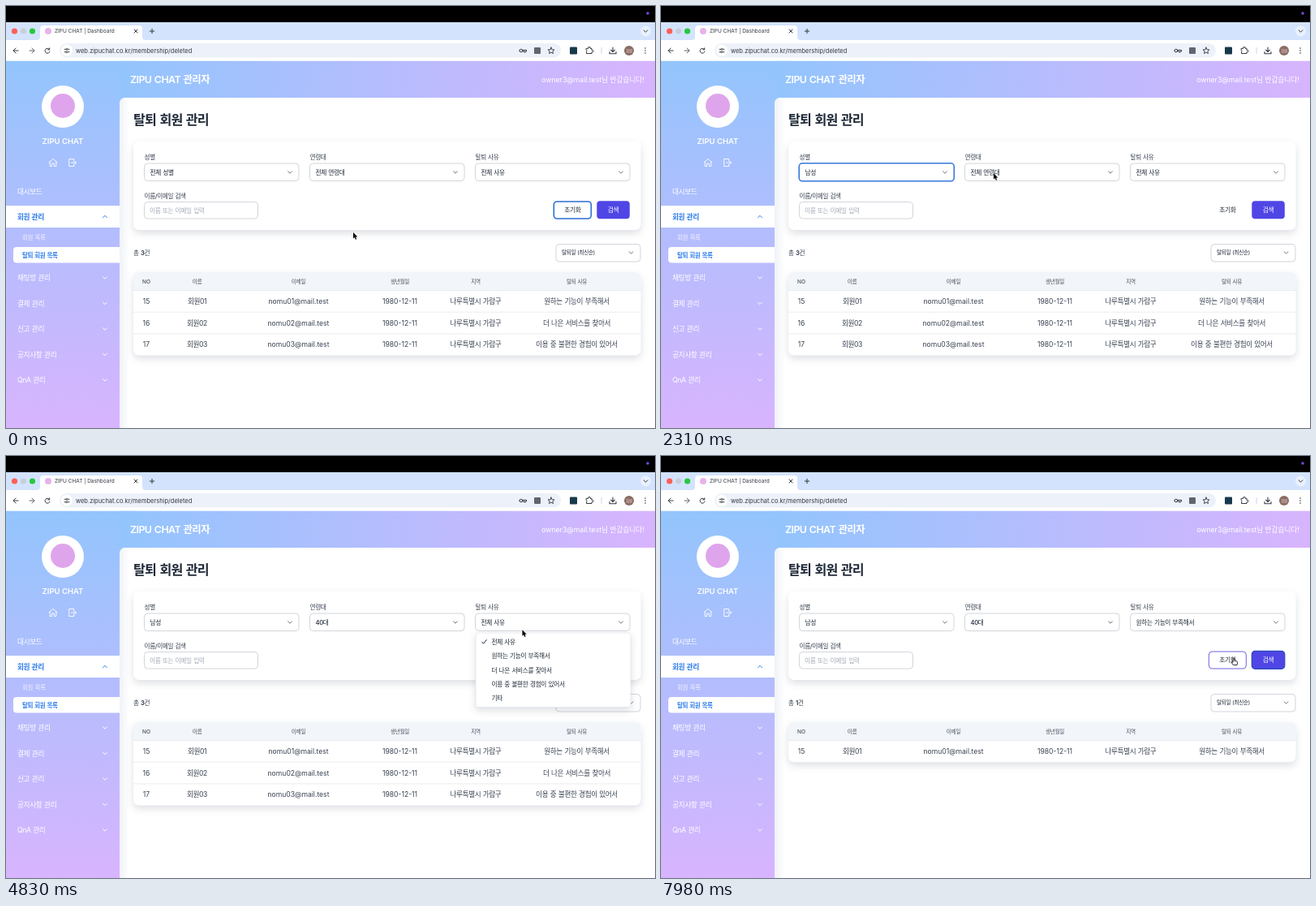
Recreate the animation shown at these times as an HTML page. Size 800 by 520 pixels, loop 8 s.

```html
<!DOCTYPE html>
<html lang="ko">
<head>
<meta charset="utf-8">
<title>ZIPU CHAT | Dashboard</title>
<style>
  html, body { margin: 0; width: 100%; height: 100%; overflow: hidden; background: #fff; }
  svg { display: block; width: 800px; height: 520px; font-family: Inter, "Noto Sans CJK KR", "Noto Sans CJK", sans-serif; }
  .line { fill: none; stroke-linecap: round; stroke-linejoin: round; }
  .shadow { filter: drop-shadow(0 4px 5px rgba(30, 41, 70, .15)); }
</style>
</head>
<body>
<svg viewBox="0 0 800 520">
  <defs>
    <linearGradient id="side" x1="0" y1="0" x2="0" y2="1">
      <stop stop-color="#93c5fd"/><stop offset="1" stop-color="#d8b4fe"/>
    </linearGradient>
    <linearGradient id="head">
      <stop stop-color="#93c5fd"/><stop offset="1" stop-color="#d8b4fe"/>
    </linearGradient>
    <linearGradient id="edge">
      <stop stop-color="#eff2f7"/><stop offset="1" stop-color="#fff"/>
    </linearGradient>
  </defs>
  <g id="scenery"></g>
  <g id="live"></g>
</svg>
<script>
const BRAND = 'ZIPU CHAT', INK = '#1f2937', BORDER = '#d1d5db', FOCUS = '#3977dc';
const LOOP = 8000, STEP = 70;

// Drawing helpers
const text = (x, y, size, str, fill = INK, weight = 400, anchor = 'start') => {
  const tight = /[가-힣]/.test(str) && !/@/.test(str);
  const spacing = tight ? `letter-spacing="${-.045 * size}" word-spacing="${.07 * size}"` : '';
  return `<text x="${x}" y="${y + size * .36}" font-size="${size}" fill="${fill}" font-weight="${weight}"
    text-anchor="${anchor}" ${spacing}>${str}</text>`;
};
const rect = (x, y, w, h, r, fill, extra = '') =>
  `<rect x="${x}" y="${y}" width="${w}" height="${h}" rx="${r}" fill="${fill}" ${extra}/>`;
const circle = (x, y, r, fill) => `<circle cx="${x}" cy="${y}" r="${r}" fill="${fill}"/>`;
const line = (d, color, width = 1, x = 0, y = 0) =>
  `<path class="line" d="${d}" stroke="${color}" stroke-width="${width}" transform="translate(${x} ${y})"/>`;
const chevron = (x, y, color = '#6b7280', up = false) =>
  line(up ? 'M-2.4 1.2L0-1.2 2.4 1.2' : 'M-2.4-1.2L0 1.2 2.4-1.2', color, 1, x, y);
const box = (x, y, w, h, stroke = BORDER, width = 1) =>
  rect(x, y, w, h, 4, '#fff', `stroke="${stroke}" stroke-width="${width}"`);

function browser() {
  const dark = '#333840';
  return rect(0, 0, 800, 20, 0, '#000') + circle(791, 9, 1.8, '#6d4bd8')
    + rect(0, 20, 800, 22, 0, '#d3e3fd') + rect(0, 42, 800, 25.5, 0, '#fff')
    + circle(10.5, 31, 3.6, '#ff5f57') + circle(21.5, 31, 3.6, '#c9ced8') + circle(32.5, 31, 3.6, '#28c840')
    + '<path d="M38 42Q42 42 42 38V28Q42 24 46 24H164Q168 24 168 28V38Q168 42 172 42Z" fill="#fff"/>'
    + circle(52, 31, 4, '#e6b3ea')
    + text(60, 31, 6.5, BRAND + ' | Dashboard', dark)
    + line('M-2-2L2 2M2-2L-2 2', dark, 1, 160, 31)
    + line('M-2.7 0H2.7M0-2.7V2.7', dark, 1, 180, 31)
    + circle(788.5, 31, 6.5, '#e9f1fe') + chevron(788.5, 31, dark)
    + line('M3 0H-3M0-3L-3 0 0 3', dark, 1, 12, 55)
    + line('M-3 0H3M0-3L3 0 0 3', '#5f6570', 1, 32, 55)
    + line('M2.5-1.6A3 3 0 1 0 3 1M2.7-3.2V-1.2H.7', dark, 1, 51, 55)
    + rect(66, 46, 618, 17.5, 8.75, '#edf1f9') + circle(75, 54.8, 7, '#fff')
    + line('M-3-1.7H-1M1.5-1.7H3M-3 1.7H-1.5M1 1.7H3', dark, .9, 75, 55)
    + line('M-.8-1.7a1 1 0 1 0 2 0a1 1 0 1 0-2 0M-1.3 1.7a1 1 0 1 0 2 0a1 1 0 1 0-2 0', dark, .8, 75, 55)
    + text(86, 55, 7.5, 'web.zipuchat.co.kr/membership/deleted', dark)
    + line('M-4 0a1.8 1.8 0 1 0 3.6 0a1.8 1.8 0 1 0-3.6 0M-.4-.7H4.5V1H3.2V2H1.8V.8H-.4', dark, 1, 637, 55)
    + rect(651, 51, 8, 8, 1, '#5f6570')
    + line('M0-4L1.1-1.3 4-1.1 1.8.8 2.5 3.6 0 2.1-2.5 3.6-1.8.8-4-1.1-1.1-1.3Z', dark, .9, 672, 55)
    + rect(695, 50.5, 9, 9, 1, '#17394a')
    + line('M-3.5-2.2H-1.2A1.3 1.3 0 1 1 1.2-2.2H3V0A1.3 1.3 0 1 1 3 2.2V4H-3.5V1.8A1 1 0 0 0-3.5 0Z', dark, 1, 719, 54.5)
    + line('M0-3.5V3.5', '#c7d3ea', 1, 734, 55)
    + line('M0-4V1.4M-2.4-.8L0 1.5 2.4-.8M-4 1.5V3.7H4V1.5', dark, 1.1, 748, 55)
    + circle(768, 55, 6, '#8b6b63') + text(768, 55, 4.4, '회원', '#f3e8e4', 400, 'middle')
    + [-3, 0, 3].map(dy => circle(788, 55 + dy, .8, dark)).join('');
}

function sidebar() {
  const menu = ['채팅방 관리', '결제 관리', '신고 관리', '공지사항 관리', 'QnA 관리'];
  const blue = '#2b7bea';
  return rect(0, 67.5, 160, 453, 0, 'url(#side)') + rect(140, 67.5, 660, 60, 0, 'url(#head)')
    + circle(70, 124, 26, '#fff') + circle(70, 123, 15, '#dfa5ec')
    + text(70, 167, 9.5, BRAND, '#fff', 600, 'middle')
    + line('M-5-.3L0-4.6 5-.3M-3.8-1.2V4.5H-1.4V1H1.4V4.5H3.8V-1.2', '#fff', .9, 58, 193)
    + line('M1.7-2V-4.5H-4.3V4.5H1.7V2M-1.5 0H4.6M2.6-2L4.6 0 2.6 2', '#fff', .9, 82, 193)
    + text(14, 229, 8.7, '대시보드', '#fff')
    + rect(0, 246, 140, 27, 0, '#fff') + text(14, 259.5, 8.7, '회원 관리', blue, 600) + chevron(122, 259.5, blue, true)
    + text(20, 285, 7.5, '회원 목록', '#f4f1ff')
    + rect(9, 297, 135, 19.5, 4, '#fff') + text(20, 307, 7.5, '탈퇴 회원 목록', blue, 600)
    + menu.map((name, i) => text(14, 335 + i * 31.5, 8.7, name, '#fff') + chevron(122, 335 + i * 31.5, '#fff')).join('')
    + text(153, 91, 12.4, BRAND + ' 관리자', '#fff', 600)
    + text(787, 91, 8.7, 'owner3@mail.test님 반갑습니다!', '#fff', 400, 'end')
    + '<path d="M140 520V121Q140 113 148 113H800V520Z" fill="#fff"/>'
    + '<path d="M140 520V121Q140 113 148 113H152V520Z" fill="url(#edge)"/>';
}

function filterCard() {
  return text(157, 140.5, 16.1, '탈퇴 회원 관리', INK, 700)
    + rect(157, 167, 625.5, 109, 7, '#fff', 'class="shadow"')
    + text(170.5, 234, 7.6, '이름/이메일 검색', '#374151', 500)
    + box(170.5, 241.5, 140, 20.5) + text(177, 252, 7.7, '이름 또는 이메일 입력', '#a3a9b5')
    + box(678, 293.5, 104, 21.5) + text(685, 304, 6.6, '탈퇴일 (최신순)') + chevron(770.5, 304);
}

const selects = [
  { x: 170.5, label: '성별', open: 910, close: 1540, pick: 1, options: ['전체 성별', '남성', '여성'] },
  { x: 374.5, label: '연령대', open: 2380, close: 3430, pick: 4,
    options: ['전체 연령대', '10대', '20대', '30대', '40대', '50대 이상'] },
  { x: 578.5, label: '탈퇴 사유', open: 4340, close: 5460, pick: 1,
    options: ['전체 사유', '원하는 기능이 부족해서', '더 나은 서비스를 찾아서', '이용 중 불편한 경험이 있어서', '기타'] },
];
const SEARCH = 6650;
const isOpen = (s, t) => t >= s.open && t < s.close;

function selectField(s, i, t) {
  const focusEnd = i < 2 ? selects[i + 1].open : SEARCH;
  const focused = t >= s.close && t < focusEnd;
  return text(s.x, 186, 7.6, s.label, '#374151', 500)
    + box(s.x, 194, 190.5, 21.5)
    + (focused ? box(s.x - .3, 193.8, 191.1, 22, FOCUS, 1.6) : '')
    + text(s.x + 7, 205, 7.7, s.options[t >= s.close ? s.pick : 0], INK, 500)
    + chevron(s.x + 179.5, 205);
}

function popup(s, mouse) {
  const rowHeight = 17.4, top = 220.3;
  const hover = Math.floor((mouse.y - top) / rowHeight);
  return rect(s.x + .5, 218, 191, s.options.length * rowHeight + 4.6, 3, '#fff',
      'class="shadow" stroke="#dfe2e8" stroke-width=".7"')
    + s.options.map((option, i) => {
      const y = top + (i + .5) * rowHeight;
      return (i === hover ? rect(s.x + 2.5, y - 8.7, 187, rowHeight, 2, '#f0f1f5') : '')
        + (i === 0 ? line('M-2.8.2L-.9 2.2 2.8-2.4', INK, 1, s.x + 11, y) : '')
        + text(s.x + 20, y, 7.7, option, INK);
    }).join('');
}

function table(rowCount) {
  const columns = [173, 235.5, 360.5, 485.5, 579, 703.5];
  const reasons = selects[2].options;
  const row = (cells, y, size, color, weight) =>
    cells.map((cell, i) => text(columns[i], y, size, cell, color, weight, 'middle')).join('');
  let out = text(157, 304, 7.6, `총 <tspan font-weight="700">${rowCount}</tspan>건`, '#374151')
    + rect(157, 328, 625.5, 22.5 + rowCount * 26.7, 7, '#fff', 'class="shadow"')
    + '<path d="M157 350.5V335Q157 328 164 328H775.5Q782.5 328 782.5 335V350.5Z" fill="#f2f5f9"/>'
    + row(['NO', '이름', '이메일', '생년월일', '지역', '탈퇴 사유'], 339.5, 6.6, '#4b5563', 500);
  for (let i = 0; i < rowCount; i++) {
    const y = 364 + i * 26.7, n = i + 1;
    out += line('M157 0H782.5', '#e5e7eb', .8, 0, y - 13.5)
      + row([14 + n, '회원0' + n, `nomu0${n}@mail.test`, '1980-12-11', '나루특별시 가람구', reasons[n]], y, 8.6, '#374151', 400);
  }
  return out;
}

const inside = (p, x, y, w, h) => p.x >= x && p.x <= x + w && p.y >= y && p.y <= y + h;
const overReset = p => inside(p, 675, 240.5, 46.5, 21.5);
const overSearch = p => inside(p, 728.5, 240.5, 40, 21.5);

function buttons(t, mouse) {
  const resetFocus = t < selects[0].open;
  const resetBorder = resetFocus ? '#2b6fd6' : overReset(mouse) ? '#6d62dc' : 'none';
  const focus = t >= SEARCH ? 'stroke="#2c47b8" stroke-width="1.2"' : '';
  return box(675.3, 241, 46, 21, resetBorder, resetFocus ? 1.6 : 1)
    + text(698.3, 251.5, 7.7, '초기화', INK, 500, 'middle')
    + rect(728.3, 240.3, 40.5, 22, 4, overSearch(mouse) ? '#4338ca' : '#4f46e5', focus)
    + text(748.5, 251.5, 7.8, '검색', '#fff', 500, 'middle');
}

// Cursor path: time, x, y
const path = [
  [0, 428, 279], [840, 240, 206], [980, 238, 208], [1330, 232, 247], [1610, 232, 247], [1820, 303, 242],
  [2240, 410, 206], [2450, 410, 206], [3080, 405, 288], [3290, 405, 299], [3500, 405, 299], [3920, 577, 197],
  [4200, 640, 205], [4690, 640, 206], [5180, 622, 247], [5530, 622, 247], [5810, 638, 248],
  [6440, 752, 250], [7280, 752, 250], [7840, 706, 249], [8000, 706, 249],
];
function mouseAt(t) {
  const i = path.findIndex(p => p[0] > t);
  const [t0, x0, y0] = path[i - 1], [t1, x1, y1] = path[i];
  const u = (t - t0) / (t1 - t0), e = u * u * (3 - 2 * u);
  return { x: x0 + (x1 - x0) * e, y: y0 + (y1 - y0) * e };
}

function cursor(mouse, popupOpen) {
  const place = `transform="translate(${mouse.x} ${mouse.y})"`;
  if (!popupOpen && inside(mouse, 170, 241, 141, 21.5))
    return line('M-1.5-4Q0-4 0-3V3Q0 4-1.5 4M1.5-4Q0-4 0-3M0 3Q0 4 1.5 4', '#222', .9, mouse.x, mouse.y);
  if (overReset(mouse) || overSearch(mouse))
    return `<path ${place} d="M-.9.6Q0-.6.9.6V3.2L3.8 4Q4.8 4.4 4.6 5.5L4 8.6H-.6L-2.8 5.6Q-2.8 4.4-.9 5.2Z" fill="#fff" stroke="#111" stroke-width=".9" stroke-linejoin="round"/>`;
  return `<path ${place} d="M0 0V7.6L1.7 6.1 2.9 8.8 4.2 8.2 3 5.6H5.3Z" fill="#000" stroke="#fff" stroke-width=".8" paint-order="stroke"/>`;
}

const scenery = document.getElementById('scenery'), live = document.getElementById('live');
scenery.innerHTML = sidebar() + browser() + filterCard();

function draw() {
  const t = Math.floor(performance.now() % LOOP / STEP) * STEP;
  const mouse = mouseAt(t), opened = selects.find(s => isOpen(s, t));
  live.innerHTML = selects.map((s, i) => selectField(s, i, t)).join('')
    + buttons(t, mouse) + table(t < SEARCH + STEP ? 3 : 1)
    + (opened ? popup(opened, mouse) : '') + cursor(mouse, opened);
  requestAnimationFrame(draw);
}
draw();
</script>
</body>
</html>
```
